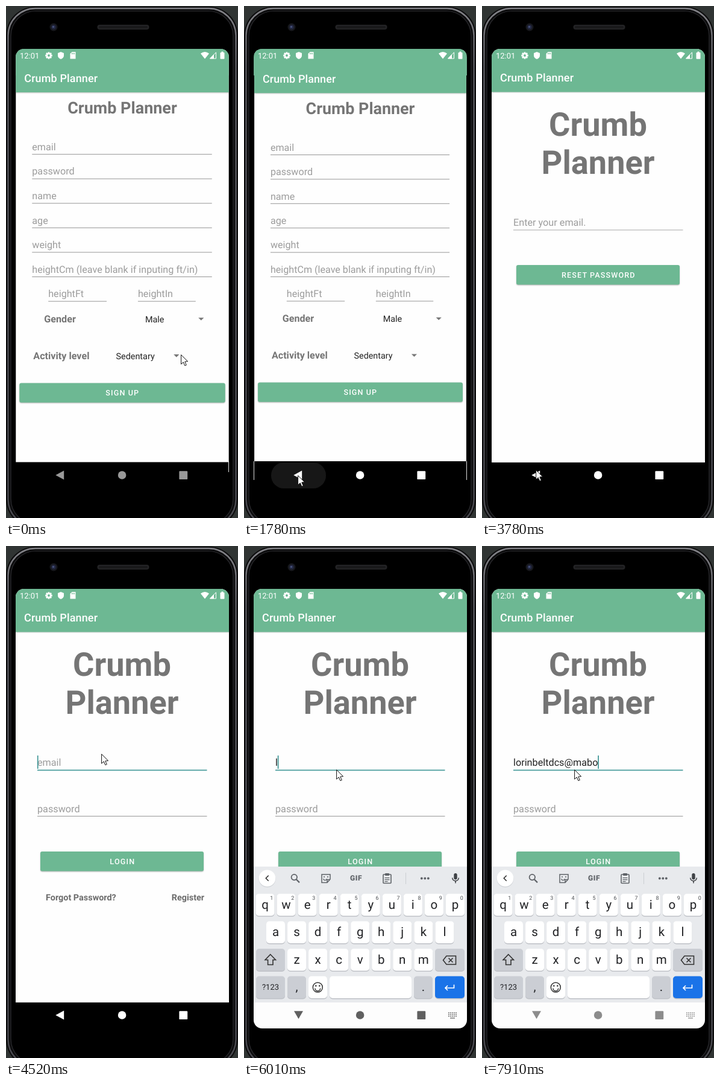
Write an HTML page with a canvas that moves like this. It is 385x848 px and loops after 8000 ms.

```html
<!DOCTYPE html>
<html lang="en">
<head>
<meta charset="utf-8">
<title>Sign-in demo</title>
<style>
html, body { margin: 0; width: 100%; height: 100%; overflow: hidden; background: #303433; }
canvas { display: block; }
</style>
</head>
<body>
<canvas id="stage" width="385" height="848"></canvas>
<script>
const c = document.getElementById('stage').getContext('2d');
const GREEN = '#6db893', GREY = '#757575', HINT = '#9c9c9c', TEAL = '#469a9a';
const ICON = '#5f6368', DARK = '#333', MOD = '#cbced4';
const APP = ['Crumb', 'Planner'];
const EMAIL = 'lorinbeltdcs@mabo';
const LOOP = 8000, BAR_TOP = 756;

// dir 1 opens a page, -1 goes back
const screens = [
  { at: -240, page: 'signup', dir: 1 },
  { at: 1760, page: 'login', dir: -1 },
  { at: 3050, page: 'reset', dir: 1 },
  { at: 4060, page: 'login', dir: -1 }
];
const glides = [
  { from: 420, to: 1080, x: 89, y: 777 },
  { from: 1950, to: 2460, x: 101, y: 580 },
  { from: 3200, to: 3640, x: 89, y: 768 },
  { from: 4220, to: 4510, x: 158, y: 344 },
  { from: 4520, to: 4820, x: 153, y: 370 }
];

const ramp = (t, a, b) => Math.min(1, Math.max(0, (t - a) / (b - a)));
const mix = (a, b, p) => a + (b - a) * p;
const smooth = p => p * p * (3 - 2 * p);

// The screen refreshes in steps that lengthen slightly after a while
const stepTime = n => 137 * n + 10.4 * Math.max(0, n - 19) - 3;

function box(x, y, w, h, r, fill) {
  c.beginPath();
  c.roundRect(x, y, w, h, r);
  c.fillStyle = fill;
  c.fill();
}

function ring(x, y, w, h, r, color, width) {
  c.beginPath();
  c.roundRect(x, y, w, h, r);
  c.strokeStyle = color;
  c.lineWidth = width;
  c.stroke();
}

function disc(x, y, r, fill) {
  c.beginPath();
  c.arc(x, y, r, 0, 7);
  c.fillStyle = fill;
  c.fill();
}

function arc(x, y, r, end, color, width = 1.6) {
  c.beginPath();
  c.arc(x, y, r, 0, end);
  c.strokeStyle = color;
  c.lineWidth = width;
  c.stroke();
}

// Paths are given relative to x, y
function fill(x, y, path, color) {
  c.save();
  c.translate(x, y);
  c.fillStyle = color;
  c.fill(new Path2D(path));
  c.restore();
}

function stroke(x, y, path, color, width = 1.6) {
  c.save();
  c.translate(x, y);
  c.strokeStyle = color;
  c.lineWidth = width;
  c.stroke(new Path2D(path));
  c.restore();
}

function text(s, x, y, size, color, weight = 400, align = 'left', gap = 0) {
  c.font = `${weight} ${size}px Roboto, sans-serif`;
  c.letterSpacing = gap + 'px';
  c.textAlign = align;
  c.fillStyle = color;
  c.fillText(s, x, y);
}

function withShadow(alpha, blur, paint) {
  c.save();
  c.shadowColor = `rgba(0,0,0,${alpha})`;
  c.shadowBlur = blur;
  c.shadowOffsetY = 1;
  paint();
  c.restore();
}

function phone() {
  c.fillStyle = '#303433';
  c.fillRect(0, 0, 385, 848);
  box(0, 1, 385, 864, 48, '#0c0c0d');
  const metal = c.createLinearGradient(0, 0, 0, 848);
  metal.addColorStop(0, '#85858a');
  metal.addColorStop(0.12, '#5b5b61');
  metal.addColorStop(1, '#4a4a50');
  ring(3.5, 4, 378, 858, 45, metal, 2.4);
  ring(8, 8.5, 369, 849, 41, '#2b2b2f', 1.2);
  box(9, 9, 367, 848, 40, '#000');
  disc(79, 35, 6.5, '#17181d');
  disc(79, 35, 3.8, '#232842');
  disc(78.5, 34.5, 1.6, '#4a5580');
  box(151.5, 31, 86, 8, 4, '#232325');
  box(154, 33, 81, 4, 2, '#19191b');
}

function gear(x, y) {
  c.save();
  c.translate(x, y);
  for (let i = 0; i < 8; i++) {
    c.rotate(Math.PI / 4);
    box(-1.4, -5.8, 2.8, 4, 0.5, '#fff');
  }
  c.restore();
  disc(x, y, 4.3, '#fff');
  disc(x, y, 1.9, GREEN);
}

function statusBar() {
  text('12:01', 23, 86.5, 13, '#fff');
  gear(71, 82);
  fill(91, 76, 'M0 0L5 2V6Q5 10 0 12Q-5 10-5 6V2Z', '#fff');
  fill(89.5, 79.5, 'L0 0M0 0L4.3 2.5L0 5Z', GREEN);
  fill(106.5, 76, 'M3 0H9V11.5H0V3Z', '#fff');
  for (let i = 0; i < 3; i++) box(109 + 2 * i, 77.5, 1, 2.6, 0, GREEN);
  fill(330, 87.5, 'M0 0L-7-8.7Q0-14.3 7-8.7Z', '#fff');
  stroke(348.5, 87, 'M0 0V-10.2L-9.9 0Z', '#fff', 1);
  fill(345, 87.3, 'M0 0V-7.3L-7 0Z', '#fff');
  box(355.5, 77, 7, 10.8, 1, '#fff');
  box(357.5, 75.6, 3, 2, 0, '#fff');
}

function field(label, x, w, rule, color = '#969696') {
  text(label, x, rule - 6.8, 16.22, HINT);
  c.fillStyle = color;
  c.fillRect(x, rule - 0.5, w, color === TEAL ? 1.7 : 1);
}

function spinner(label, choice, x, choiceX, arrowX, y) {
  text(label, x, y, 16.22, GREY, 700);
  text(choice, choiceX, y, 14.42, '#222');
  fill(arrowX, y - 7.7, 'M-4.6 0H4.6L0 4.6Z', '#777');
}

function button(label, x, y, w) {
  withShadow(0.3, 2, () => box(x, y, w, 32.5, 3, GREEN));
  text(label, 193.3, y + 21, 12.62, '#fff', 500, 'center', 1.13);
}

function bigTitle() {
  APP.forEach((word, i) => text(word, 192.5, 215 + 63 * i, 54.1, GREY, 700, 'center'));
}

const pages = {
  signup() {
    text(APP.join(' '), 193, 177.5, 27.04, GREY, 700, 'center');
    ['email', 'password', 'name', 'age', 'weight', 'heightCm (leave blank if inputing ft/in)']
      .forEach((s, i) => field(s, 43, 299, 245.3 + i * 40.65));
    field('heightFt', 70, 97, 489.2);
    field('heightIn', 219, 96, 489.2);
    spinner('Gender', 'Male', 63, 231, 324, 524);
    spinner('Activity level', 'Sedentary', 45, 182.5, 283, 585);
    button('SIGN UP', 22, 624.7, 342);
  },
  login(s) {
    bigTitle();
    field(s.typed ? '' : 'email', 52, 281.5, 371, TEAL);
    field('password', 52, 281.5, 447.5);
    const typed = EMAIL.slice(0, s.typed);
    text(typed, 52, 364.2, 16.22, '#222');
    c.fillStyle = TEAL;
    if (s.caret) c.fillRect(51.8 + c.measureText(typed).width, 347, 1.8, 22);
    button('LOGIN', 57, 506, 271);
    text('Forgot Password?', 66, 586.7, 14.42, '#6c6c6c', 700);
    text('Register', 274.7, 586.7, 14.42, '#6c6c6c', 700);
  },
  reset() {
    bigTitle();
    field('Enter your email.', 52, 281.5, 371, '#a8a8a8');
    button('RESET PASSWORD', 57, 429, 271);
  }
};

function page(s) {
  c.save();
  c.beginPath();
  c.rect(16, 71, 354, BAR_TOP - 71);
  c.clip();
  c.fillStyle = GREEN;
  c.fillRect(16, 71, 354, 44);
  c.translate(193, 435);
  c.scale(s.scale, s.scale);
  c.translate(-193, -435);
  c.fillStyle = '#fefefe';
  c.fillRect(16, 71, 354, BAR_TOP - 71);
  withShadow(0.25, 2, () => box(16, 60, 354, 82.4, 0, GREEN));
  text(APP.join(' '), 30, 125, 18.03, '#fff', 500, 'left', 0.135);
  pages[s.page](s);
  c.restore();
}

function key(x, y, w, color, label = '', size = 20.5) {
  box(x, y + 1, w, 37, 5, '#bfc2c7');
  box(x, y, w, 36.5, 5, color);
  text(label, x + w / 2, y + 18 + size / 3, size, '#202124', 400, 'center');
}

function keyRow(letters, x, y) {
  [...letters].forEach((k, i) => key(x + i * 35.05, y, 31, '#fff', k));
}

function toolbar() {
  disc(38.5, 551.3, 14, '#cfd2d6');
  disc(38.5, 550.3, 13.8, '#fff');
  stroke(36.3, 550.3, 'M4.4-4.5L0 0L4.4 4.5', DARK);
  arc(83.3, 548.6, 4.7, 7, ICON, 1.8);
  stroke(86.8, 552.2, 'M0 0L5.2 5.2', ICON, 2.2);
  stroke(129, 544, 'M0 0H14V8L9 13.5H0ZM9 13V8.5H14', ICON, 1.5);
  for (const x of [133, 139]) disc(x, 548, 1.1, ICON);
  arc(134.5, 551, 2.6, Math.PI, ICON, 1.2);
  text('GIF', 186, 554.3, 12, ICON, 900, 'center', 0.6);
  ring(231, 544, 13, 14.5, 1, ICON, 1.6);
  box(234, 542, 7, 4, 1, ICON);
  for (let i = 0; i < 3; i++) {
    box(233.5, 549 + 3 * i, i < 2 ? 8 : 5, 1.2, 0, ICON);
    disc(294.8 + 5.5 * i, 550.5, 1.9, ICON);
  }
  box(268, 541, 1, 19, 0, '#cbced2');
  box(348.3, 542, 5.4, 10.5, 2.7, '#3f4246');
  arc(351, 549.5, 5.3, Math.PI, '#3f4246', 1.5);
  box(350.2, 555, 1.6, 3.5, 0, '#3f4246');
}

function smiley(x, y) {
  arc(x, y, 8, 7, DARK, 1.5);
  arc(x, y + 1.5, 4.4, Math.PI, DARK, 1.5);
  for (const side of [-3, 3]) disc(x + side, y - 2.5, 1.3, DARK);
}

function keyboard(up) {
  c.save();
  c.beginPath();
  c.rect(16, 520, 354, BAR_TOP - 520);
  c.clip();
  c.translate(0, (1 - up) * 225);
  box(16, 531, 354, 225, 0, '#e8eaed');
  toolbar();
  const row = i => 576 + 45.5 * i;
  keyRow('qwertyuiop', 19.5, row(0));
  for (let i = 0; i < 10; i++)
    text((i + 1) % 10, 45.8 + i * 35.05, 586, 9, '#4c4f53', 400, 'center');
  keyRow('asdfghjkl', 37, row(1));
  keyRow('zxcvbnm', 72, row(2));
  key(20, row(2), 48, MOD);
  key(317, row(2), 49, MOD);
  key(20, row(3), 48, MOD, '?123', 13);
  key(72, row(3), 31, MOD, ',');
  key(107, row(3), 31, '#fff');
  key(142, row(3), 136, '#fff');
  key(282, row(3), 31, MOD, '.');
  key(317, row(3), 49, '#1a73e8');
  stroke(43.8, 676.5, 'M0 0L8.7 9H4.2V17H-4.2V9H-8.7Z', DARK);
  stroke(343, 686, 'M-12.5 0L-7-7H8.5V7H-7ZM-3.5-3.5L3.5 3.5M3.5-3.5L-3.5 3.5', DARK);
  smiley(122.3, 731);
  stroke(334, 732, 'M14.5-5.5V0H0M4-4L0 0L4 4', '#fff', 1.7);
  c.restore();
}

function navBar(s) {
  box(16, BAR_TOP, 354, 43, 0, s.up ? '#fdfdfd' : '#000');
  if (s.ripple) box(45, BAR_TOP, 91, 43, 21, '#171717');
  const col = `rgb(${s.nav},${s.nav},${s.nav})`;
  if (s.up) fill(90.5, 770.3, 'M-7.5 0H7.5L0 13Z', col);
  else fill(82.3, 777, 'M0 0L13.9-7.5V7.5Z', col);
  disc(192.6, 777, 6.8, col);
  box(287.4, 770.3, 13.8, 13.8, 1.2, col);
  if (!s.up) return;
  for (let i = 0; i < 15; i++)
    box(339 + (i % 5) * 3, 772.5 + Math.floor(i / 5) * 2.7, 1.8, 1.6, 0, col);
  box(342, 781.2, 8, 1.4, 0, col);
}

function pointer(t) {
  let x = 290, y = 577;
  for (const g of glides) {
    const p = smooth(ramp(t, g.from, g.to));
    x = mix(x, g.x, p);
    y = mix(y, g.y, p);
  }
  const shape = 'M0 0V15.5L3.7 12.2L6.2 18L8.7 17L6.2 11.3L11 11Z';
  fill(x + 0.6, y + 0.7, shape, '#fff');
  stroke(x + 0.6, y + 0.7, shape, '#111', 1);
}

function stateAt(t) {
  const i = screens.filter(v => v.at <= t).length - 1;
  const { at, page, dir } = screens[i];
  const p = ramp(t, at, at + 400), settle = (1 - p) ** 5;
  const leaving = p < 0.2;
  const back = screens.find(v => v.dir < 0 && t > v.at - 140 && t < v.at + 300);
  const focus = t < 5100 ? 4500 : 5100;
  const typed = t < 5980 ? 0 : 1 + Math.round((EMAIL.length - 1) * ramp(t, 6137, 7900));
  return {
    page: leaving ? screens[i - 1].page : page,
    scale: leaving ? 1 - 0.14 * p : dir > 0 ? 1 - 0.15 * settle : 1 + 0.1 * settle,
    ripple: Boolean(back),
    typed,
    caret: typed > 0 || (t > focus && Math.floor((t - focus) / 590) % 2 === 0),
    up: 1 - (1 - ramp(t, 5060, 5400)) ** 2,
    nav: Math.round(t < 5100 ? mix(153, 255, ramp(t, 420, 1080)) : mix(96, 140, ramp(t, 6010, 7900)))
  };
}

function draw(t) {
  const s = stateAt(t);
  c.textRendering = 'geometricPrecision';
  phone();
  c.save();
  c.beginPath();
  c.roundRect(16, 71, 354, 728, 14);
  c.clip();
  page(s);
  statusBar();
  if (s.up) keyboard(s.up);
  navBar(s);
  if (s.scale < 0.9999) box(369, 754, 1, s.ripple ? 31 : 18, 0, '#ddd');
  if (s.scale < 0.9999 && s.ripple) box(16, 754, 1, 31, 0, '#ddd');
  c.restore();
  pointer(t);
}

let start = null, shown = -1;
function tick(now) {
  if (start === null) start = now;
  const t = (now - start) % LOOP;
  let n = 0;
  while (stepTime(n + 1) <= t) n++;
  if (n !== shown) draw(stepTime(shown = n));
  requestAnimationFrame(tick);
}
requestAnimationFrame(tick);
</script>
</body>
</html>
```
